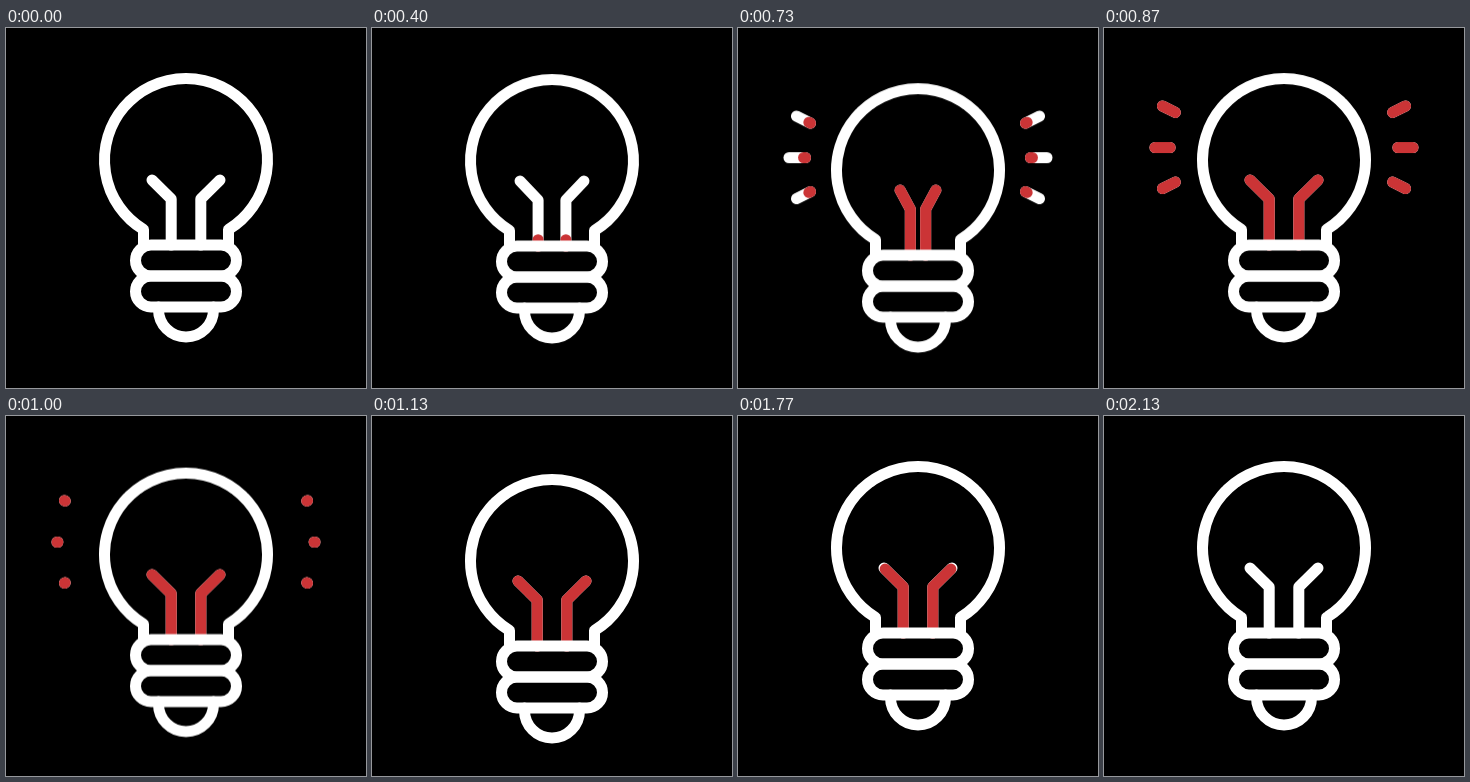
Recreate the animation shown at these times as an HTML page. Size 360x360 px, loop 2.5 s.

```html
<!DOCTYPE html>
<html lang="en">
<head>
<meta charset="utf-8">
<title>Light bulb</title>
<style>
  html, body { margin: 0; width: 100%; height: 100%; overflow: hidden; background: #000; }
  svg { display: block; width: 100vw; height: 100vh; }

  .bulb, .wire, .ray, .red {
    animation: 2500ms cubic-bezier(.37, 0, .63, 1) infinite;
  }
  .bulb {
    fill: none;
    stroke: #fff;
    stroke-width: 11;
    stroke-linecap: round;
    stroke-linejoin: round;
    animation-name: bounce;
  }
  .ray, .red { stroke-dasharray: 1 2; }
  .red { stroke: #cb3436; }
  .wire { animation-name: squeeze; }
  .wire.red { animation-name: squeeze, heat; }
  .ray { animation-name: flash; }
  .ray.red { animation-name: glow; }

  @keyframes bounce {
    0%, 13.333%, 34.667%, 52.667%, 100% { transform: translateY(0); }
    27.333% { transform: translateY(12px); }
    45.333% { transform: translateY(13px); }
  }
  @keyframes squeeze {
    0%, 13.333%, 34.667%, 100% { d: path("M165.2 217L165.2 171L146 152"); }
    26.667% { d: path("M174.5 217L174.5 171L167 152"); }
  }
  @keyframes heat {
    0%, 13.333% { stroke-dashoffset: 1.01; }
    26.667%, 69.333% { stroke-dashoffset: 0; }
    85.333%, 100% { stroke-dashoffset: 1.01; }
  }
  /* Rays grow outward, then leave outward. */
  @keyframes flash {
    0%, 18.667% { stroke-dashoffset: 1.01; }
    28%, 33.333% { stroke-dashoffset: 0; }
    41.333%, 100% { stroke-dashoffset: -1.01; }
  }
  @keyframes glow {
    0%, 28% { stroke-dashoffset: 1.01; }
    33.333% { stroke-dashoffset: 0; }
    41.333%, 100% { stroke-dashoffset: -1.01; }
  }
</style>
</head>
<body>
<svg viewBox="0 0 360 360">
  <g class="bulb">
    <g>
      <path class="wire" pathLength="1" d="M165.2 217L165.2 171L146 152"/>
      <path class="wire red" pathLength="1" d="M165.2 217L165.2 171L146 152"/>
      <path class="ray" pathLength="1" d="M72.5 85L58.5 78"/>
      <path class="ray" pathLength="1" d="M67.5 119.5H51"/>
      <path class="ray" pathLength="1" d="M72.5 153.5L58.5 160.5"/>
      <path class="ray red" pathLength="1" d="M72.5 85L58.5 78"/>
      <path class="ray red" pathLength="1" d="M67.5 119.5H51"/>
      <path class="ray red" pathLength="1" d="M72.5 153.5L58.5 160.5"/>
    </g>
    <g transform="matrix(-1 0 0 1 360 0)">
      <path class="wire" pathLength="1" d="M165.2 217L165.2 171L146 152"/>
      <path class="wire red" pathLength="1" d="M165.2 217L165.2 171L146 152"/>
      <path class="ray" pathLength="1" d="M72.5 85L58.5 78"/>
      <path class="ray" pathLength="1" d="M67.5 119.5H51"/>
      <path class="ray" pathLength="1" d="M72.5 153.5L58.5 160.5"/>
      <path class="ray red" pathLength="1" d="M72.5 85L58.5 78"/>
      <path class="ray red" pathLength="1" d="M67.5 119.5H51"/>
      <path class="ray red" pathLength="1" d="M72.5 153.5L58.5 160.5"/>
    </g>
    <path d="M137.5 217V201.5A81.5 81.5 0 1 1 222.5 201.5V217"/>
    <rect x="129.5" y="217" width="101" height="31" rx="15.5"/>
    <rect x="129.5" y="248" width="101" height="31" rx="15.5"/>
    <path d="M152.5 279V281.5A27.5 27.5 0 0 0 207.5 281.5V279"/>
  </g>
</svg>
</body>
</html>
```
